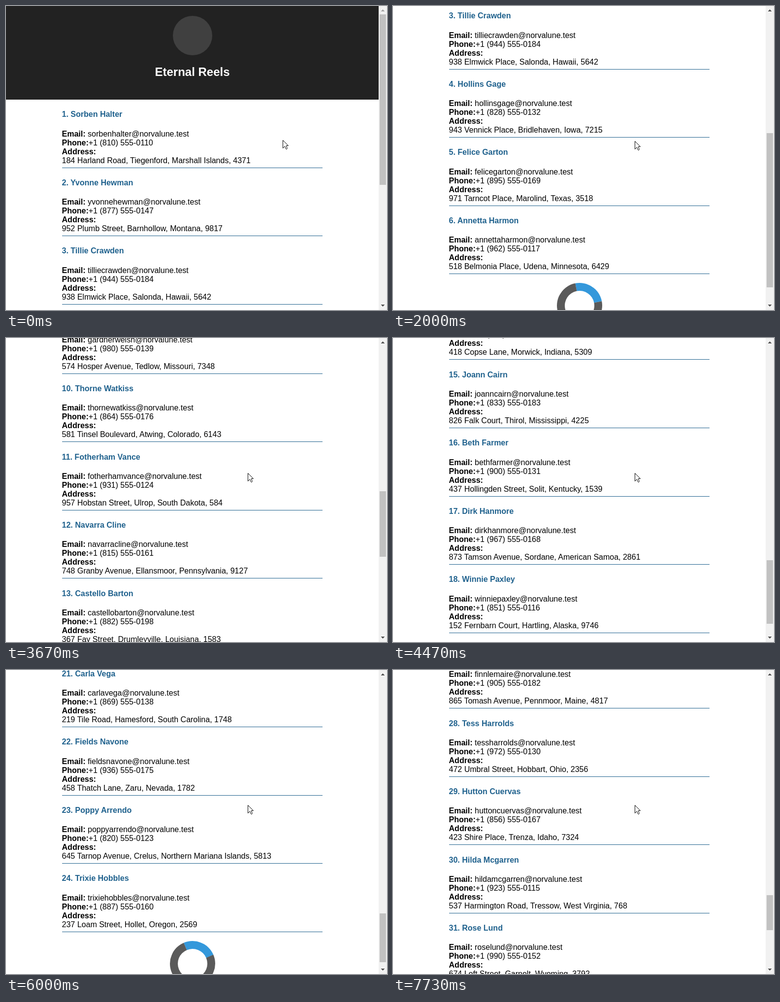
An HTML page that plays this animation: 774x617 px, repeating every 8000 ms.

```html
<!DOCTYPE html>
<html lang="en">
<head>
<meta charset="utf-8">
<title>Endless list</title>
<style>
  html, body { margin: 0; width: 100%; height: 100%; overflow: hidden; background: #fff; }
  body { position: relative; font: 16px "Liberation Sans", Arial, sans-serif; color: #000; }
  #page { position: absolute; left: 0; top: 0; width: 757px; }
  header { position: relative; height: 190px; background: #222; }
  .logo { position: absolute; left: 338.5px; top: 20px; width: 80px; height: 80px; border-radius: 50%; background: #404040; }
  #list { width: 70%; margin: 0 auto; }
  .item { padding-bottom: 5px; border-bottom: 1px solid #1f618d; white-space: nowrap; }

  /* A strut on each line fixes the baseline, whatever the font's own metrics. */
  h2, h4, p { height: 18px; margin: 0; line-height: 0; }
  h2::before, h4::before, p::before { content: ""; display: inline-block; height: 14px; }
  h4 { margin: 1.33em 0; font-size: 16px; color: #1f618d; }
  h2 { position: absolute; left: 0; right: 0; top: 120px; font-size: 24px; text-align: center; color: #fff; }
  h2::before { height: 22px; }

  #spinner { width: 60px; height: 60px; margin: 18.2px auto 0; border: 16px solid #5a5a5a; border-top-color: #3498db; border-radius: 50%; }
  #bar { position: absolute; left: 757px; top: 0; width: 17px; height: 617px; background: #f1f1f1; }
  #thumb { position: absolute; left: 2px; width: 13px; background: #c1c1c1; }
  #bar svg { position: absolute; left: 0; top: 0; }
  #cursor { position: absolute; left: 0; top: 0; }
</style>
</head>
<body>
<div id="page">
  <header><div class="logo"></div><h2>Eternal Reels</h2></header>
  <div id="list"></div>
  <div id="spinner"></div>
</div>
<div id="bar">
  <div id="thumb"></div>
  <svg width="17" height="617" shape-rendering="crispEdges">
    <path id="up" d="M5 11H12L8.5 7Z"/>
    <path id="down" d="M5 606H12L8.5 610Z"/>
  </svg>
</div>
<svg id="cursor" width="13" height="20"><path d="M.5 .5V16.5L4.5 12.7 7 18.5H8.5L9.5 17.5 7.3 11.5H11.5Z" fill="#fff" stroke="#000" stroke-linejoin="round"/></svg>
<script>
const people = `Sorben Halter|184 Harland Road, Tiegenford, Marshall Islands, 4371
Yvonne Hewman|952 Plumb Street, Barnhollow, Montana, 9817
Tillie Crawden|938 Elmwick Place, Salonda, Hawaii, 5642
Hollins Gage|943 Vennick Place, Bridlehaven, Iowa, 7215
Felice Garton|971 Tarncot Place, Marolind, Texas, 3518
Annetta Harmon|518 Belmonia Place, Udena, Minnesota, 6429
Olive Tanner|643 Quill Street, Farnley, Nebraska, 2185
Ramon Pickett|275 Alder Court, Winslop, Vermont, 8064
Gardner Welsh|574 Hosper Avenue, Tedlow, Missouri, 7348
Thorne Watkiss|581 Tinsel Boulevard, Atwing, Colorado, 6143
Fotherham Vance|957 Hobstan Street, Ulrop, South Dakota, 584
Navarra Cline|748 Granby Avenue, Ellansmoor, Pennsylvania, 9127
Castello Barton|367 Fay Street, Drumleyville, Louisiana, 1583
Edith Farrow|418 Copse Lane, Morwick, Indiana, 5309
Joann Cairn|826 Falk Court, Thirol, Mississippi, 4225
Beth Farmer|437 Hollingden Street, Solit, Kentucky, 1539
Dirk Hanmore|873 Tamson Avenue, Sordane, American Samoa, 2861
Winnie Paxley|152 Fernbarn Court, Hartling, Alaska, 9746
Montreves Haskinton|734 Cobble Street, Lanmere, Delaware, 6612
Alden Pruitt|321 Wharf Place, Tolvane, Arizona, 3097
Carla Vega|219 Tile Road, Hamesford, South Carolina, 1748
Fields Navone|458 Thatch Lane, Zaru, Nevada, 1782
Poppy Arrendo|645 Tarnop Avenue, Crelus, Northern Mariana Islands, 5813
Trixie Hobbles|237 Loam Street, Hollet, Oregon, 2569
Farrell Dugan|563 Tallow Road, Brindle, Kansas, 7750
Mabel Stroud|189 Orchid Lane, Pemwell, Utah, 4402
Finn Lemaire|865 Tomash Avenue, Pennmoor, Maine, 4817
Tess Harrolds|472 Umbral Street, Hobbart, Ohio, 2356
Hutton Cuervas|423 Shire Place, Trenza, Idaho, 7324
Hilda Mcgarren|537 Harmington Road, Tressow, West Virginia, 768
Rose Lund|674 Loft Street, Garnelt, Wyoming, 3792`.split('\n').map(row => row.split('|'));

const $ = id => document.getElementById(id);
const list = $('list'), spinner = $('spinner');

list.innerHTML = people.map(([name, address], i) => `<div class="item">
  <h4>${i + 1}. ${name}</h4>
  <p><b>Email:</b> ${name.replace(' ', '').toLowerCase()}@norvalune.test</p>
  <p><b>Phone:</b>+1 (${810 + i * 67 % 183}) 555-01${10 + i * 37 % 89}</p>
  <p><b>Address:</b></p>
  <p>${address}</p></div>`).join('');

const LOOP = 8000, FPS = 15, VIEW = 617, TRACK = 583, BATCH = 6, PITCH = 138.53125;

// Each burst scrolls to the bottom, shows the spinner, follows it down, then loads a batch.
const bursts = [
  { start: 1430, spin: 1811, rise: 386, settle: 2260, load: 2330, hide: 2395, end: 519 },
  { start: 2770, spin: 3078, rise: 215, settle: 3320, load: 3660, hide: 3660, end: 1364 },
  { start: 4100, spin: 4457, rise: 215, settle: 4990, load: 4990, hide: 4990, end: 2177 },
  { start: 5570, spin: 5878, rise: 215, settle: 6395, load: 6460, hide: 6460, end: 3008 },
  { start: 6858, spin: 7150, rise: 215, settle: 7725, load: 7725, hide: 7725, end: 3852, height: 5100 }
];

const smooth = x => { x = Math.min(1, Math.max(0, x)); return x * x * (3 - 2 * x); };
const mix = (a, b, k) => a + (b - a) * k;
const listHeight = count => 208.2 + count * PITCH;

// The turning square box of the spinner makes the page grow and shrink.
function spinnerHeight(angle) {
  const a = angle * Math.PI / 180;
  return 46 + 46 * (Math.abs(Math.cos(a)) + Math.abs(Math.sin(a)));
}

function stateAt(t) {
  const i = bursts.findLastIndex(b => t >= b.start);
  if (i < 0) return { scroll: 0, count: BATCH, height: listHeight(BATCH), spinning: false, angle: 0 };
  const b = bursts[i], loaded = t >= b.load;
  const count = BATCH * (i + (loaded ? 2 : 1));
  const spinning = t >= b.spin && t < b.hide;
  const angle = (t - b.spin) * 0.18;
  const height = loaded && b.height || listHeight(count) + (spinning ? spinnerHeight(angle) : 0);
  const bottom = listHeight(count) - VIEW;
  let scroll = b.end;
  if (t < b.spin) {
    const from = i ? bursts[i - 1].end : 0;
    scroll = mix(from, bottom, smooth((t - b.start) / (b.spin - b.start)));
  } else if (t < b.settle) {
    scroll = Math.min(bottom + 112 * smooth((t - b.spin) / b.rise), height - VIEW);
  }
  return { scroll: Math.round(scroll), count, height, spinning, angle };
}

function render(t) {
  const s = stateAt(t);
  $('page').style.transform = `translateY(${-s.scroll}px)`;
  [...list.children].forEach((item, i) => item.style.display = i < s.count ? '' : 'none');
  spinner.style.display = s.spinning ? '' : 'none';
  spinner.style.transform = `rotate(${s.angle}deg)`;

  $('thumb').style.top = 17 + Math.floor(s.scroll * TRACK / s.height) + 'px';
  $('thumb').style.height = Math.round(TRACK * VIEW / s.height) + 'px';
  $('up').style.fill = s.scroll > 0 ? '#505050' : '#a3a3a3';
  $('down').style.fill = s.scroll < s.height - VIEW - 1 ? '#505050' : '#a3a3a3';

  const k = smooth((t - 770) / 230);
  $('cursor').style.transform = `translate(${Math.round(mix(562, 491, k))}px, ${Math.round(mix(272, 274, k))}px)`;
}

let origin, shown = -1;
function tick(now) {
  origin ??= now;
  const frame = Math.floor(((now - origin) % LOOP + 4) * FPS / 1000);
  if (frame !== shown) render((shown = frame) * 1000 / FPS);
  requestAnimationFrame(tick);
}
render(0);
requestAnimationFrame(tick);
</script>
</body>
</html>
```
